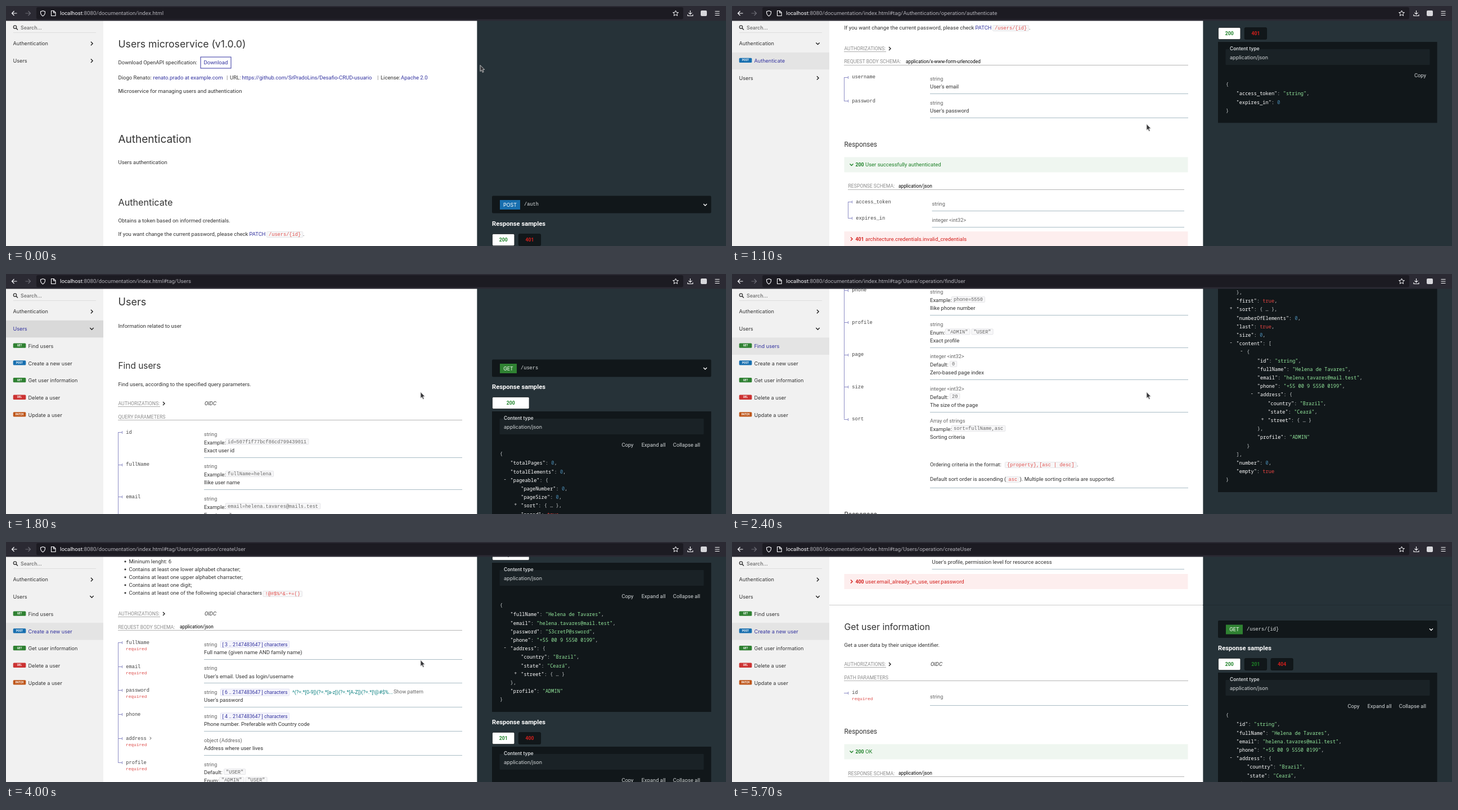
An HTML page for the animation above (6.8 s loop, 1280 by 428 pixels).

```html
<!DOCTYPE html>
<html lang="en">
<head>
<meta charset="utf-8">
<title>Users microservice</title>
<style>
html, body { margin: 0; width: 100%; height: 100%; overflow: hidden; background: #263238; }
svg { display: block; width: 100%; height: 100%; }
text { white-space: pre; }
.r { font-family: Roboto, sans-serif; }
.i { font-family: Inter, sans-serif; }
.m { font-family: "Liberation Mono", monospace; }
.n { font-family: "Noto Sans Mono", monospace; }
.b { font-weight: 700; }
.s { font-weight: 600; }
.o { font-style: italic; }
</style>
</head>
<body>
<svg viewBox="0 0 1280 428" preserveAspectRatio="none">
  <rect width="1280" height="428" fill="#263238"/>
  <rect x="173" width="664.4" height="428" fill="#fff"/>
  <g id="page"></g>
  <g id="side"></g>
  <g id="bar"></g>
  <path id="cursor" d="M.5.5V11.6L3 9.4 4.8 13.4 6.7 12.5 4.9 8.7 8.2 8.4Z" fill="#37373a" stroke="#e8e8e8" stroke-width=".8"/>
</svg>
<script>
const $ = id => document.getElementById(id);
const INK = '#333', BLUE = '#32329f', GREEN = '#1d8127', RED = '#d41f1c';
const VERB = { GET: '#2f8132', POST: '#186faf', DEL: '#cc3333', PATCH: '#bf581d' };
const PERSON = 'Helena de Tavares', MAIL = 'helena.tavares@mail.test', PHONE = '+55 00 9 5550 0199';

let out = [], oy = 0;
const esc = s => String(s).replace(/&/g, '&amp;').replace(/</g, '&lt;');
const put = s => out.push(s);
const flush = id => { $(id).innerHTML = out.join(''); out = []; };

// y is the middle of the capitals
function raw(x, y, html, size, fill, cls, anchor = 'start') {
  put(`<text x="${x}" y="${(y + oy + size * .345).toFixed(2)}" font-size="${size}" fill="${fill}" class="${cls}" text-anchor="${anchor}">${html}</text>`);
}
const text = (x, y, s, size = 9.5, fill = INK, cls = 'r', anchor) => raw(x, y, esc(s), size, fill, cls, anchor);
const rect = (x, y, w, h, fill, extra = '') =>
  put(`<rect x="${x}" y="${y + oy}" width="${w}" height="${h}" fill="${fill}" ${extra}/>`);
const path = (d, stroke, w = 1, fill = 'none') =>
  put(`<path d="${d}" fill="${fill}" stroke="${stroke}" stroke-width="${w}"/>`);
const rule = (x, y, x2, fill = '#a9bcc5') => rect(x, Math.floor(y - .4), x2 - x, 1, fill);

function chevron(x, y, down, color, r = 3, w = 1.4) {
  y += oy;
  path(down ? `M${x - r} ${y - r / 2}l${r} ${r} ${r} ${-r}` : `M${x - r / 2} ${y - r}l${r} ${r} ${-r} ${r}`, color, w);
}

function code(x, y, s, fill = '#e0504d') {
  const w = s.length * 5.2 + 8;
  rect(x + .5, y - 5, w - 1, 10, '#f7f7f8', 'stroke="#dfdfe2" stroke-width=".8" rx="1"');
  text(x + 4, y, s, 8.67, fill, 'm');
  return x + w;
}

// ---- left column ----
const DX = { 'Example:': 38, 'Default:': 35, 'Enum:': 27 };

function typeLine(x, y, s) {
  const [type, min, pattern] = s.split('|');
  text(x, y, type, 9.2, '#666');
  if (!min) return;
  rect(x + 29.5, y - 6, 122, 12, '#f4f4fc', 'stroke="#dcdcf0" stroke-width=".8" rx="1"');
  text(x + 32.5, y, `[ ${min} .. 2147483647 ] characters`, 8.8, BLUE);
  if (!pattern) return;
  text(x + 157, y, '^(?=.*[0-9])(?=.*[a-z])(?=.*[A-Z])(?=.*[!@#$%...', 9.1, '#0b8080');
  text(x + 337, y - 1, 'Show pattern', 9, '#666');
}

function bodyLine(x, y, s) {
  const [label, ...codes] = s.split(' ~');
  text(x, y, label);
  let cx = x + DX[label];
  for (const c of codes) cx = code(cx, y - 1.5, c, '#666') + 2;
}

// each item: [name, type, ...lines]; "*" = required, ">" = expandable
function fields(y, items, inner = false, open = false) {
  const x = inner ? 206 : 199, tx = inner ? 355.5 : 352, end = inner ? 804 : 811, top = y;
  let last = y;
  items.forEach(([name, type, ...lines], n) => {
    const label = name.replace(/[*>]/g, '');
    last = y;
    rect(x, Math.round(y), 8, 1, '#8d8dc6');
    rect(x + 7, Math.round(y) - 2, 1, 5, '#8d8dc6');
    text(x + 14.3, y, label, 8.67, '#444', 'm');
    if (name.includes('>')) chevron(x + 21.5 + label.length * 5.2, y, false, '#555', 2.4, 1);
    if (name.includes('*')) text(x + 14, y + 11.3, 'required', 7.8, '#dc4644', 'm');
    y += 3.7;
    typeLine(tx, y, type);
    for (const s of lines) bodyLine(tx, y += s.includes('~') ? 14.7 : 14, s);
    y += 13;
    if (!open || n < items.length - 1) rule(tx, y, end);
    y += 12.1;
  });
  if (last > top) rect(x, Math.round(top), 1, last - top, '#8d8dc6');
}

function auth(y, scheme) {
  text(199.5, y, 'AUTHORIZATIONS:', 8.7, '#8c8c8c');
  rule(199, y + 6, 274, '#aaa');
  chevron(280.5, y, false, '#222');
  if (scheme) text(353, y, scheme, 9.5, INK, 'r o');
}

function schema(y, label, value, inner) {
  const x = inner ? 206 : 199;
  text(x + .5, y, label, 8.7, '#8c8c8c');
  if (value) text(inner ? 296 : 309, y, value, 8.3, '#000');
  rule(x, y + 6.5, inner ? 804 : 811, '#b5b5b5');
}

function response(y, status, s, ok) {
  const color = ok ? GREEN : RED;
  rect(199.5, y - 13.5, 611, 27, ok ? '#eff6f0' : '#fdeeee');
  chevron(212.5, y, ok, color);
  text(219.5, y, status, 8.8, color, 'r b');
  text(237, y, s, 9.5, color);
}

const heading = (y, s, size) => text(199.5, y, s, size, INK, 'i');
const para = (y, s) => text(199.5, y, s);

// ---- right column ----
const TOKEN = /("[^"]*")(?=:)|("[^"]*")|(true|false)|(\d+)|([^"\dtf]+)/g;
const TINT = ['#fff', '#93e79c', '#e64441', '#4a8bb3', '#c4c8ca'];

function json(y, rows) {
  rows.forEach((row, n) => {
    const [, pad, mark, s] = row.match(/^( *)([+-]?)(.*)$/);
    const x = 878 + pad.length * 18.6, ry = n ? y + 1.3 + n * 15.2 : y;
    if (mark) text(x - 12, ry - 2, mark, 8.67, '#ddd', 'n');
    const html = s.replace(TOKEN, (t, ...g) => `<tspan fill="${TINT[g.findIndex(v => v !== undefined)]}">${esc(t)}</tspan>`);
    raw(x, ry, html, 8.67, '#fff', 'n');
  });
}

function sample(y, tabs, rows, fold = true) {
  const w = tabs.length > 1 ? 39.3 : 65.5;
  const bottom = y + 91 + 1.3 + (rows.length - 1) * 15.2 + 21.5;
  rect(864, y + 15, 389.6, bottom - y - 15, '#11171a');
  tabs.forEach((t, n) => {
    const x = 864.6 + n * 46.7;
    rect(x, y - 10.5, w, 21, n ? '#11171a' : '#fff', 'rx="2" stroke="#0b0f11" stroke-width=".67"');
    text(x + w / 2, y, t, 8.7, t === 'Payload' ? INK : t < 300 ? GREEN : RED, 'r b', 'middle');
  });
  rect(877.5, y + 28, 363, 28, '#1a2226', 'rx="1"');
  text(885, y + 27.5, 'Content type', 8.4, '#d4d8da', 'i s');
  text(885, y + 42.5, 'application/json', 9.1, '#d4d8da', 'i');
  const tool = (x, s) => text(x, y + 75, s, 9.4, '#d4d8da', 'r', 'end');
  tool(1234, fold ? 'Collapse all' : 'Copy');
  if (fold) { tool(1172.5, 'Expand all'); tool(1115.5, 'Copy'); }
  json(y + 91, rows);
}

function endpoint(y, verb, url) {
  const w = verb === 'GET' ? 30 : 36;
  rect(864, y - 15.5, 389.6, 31, '#11171a', 'rx="2"');
  rect(878, y - 8, w, 17, VERB[verb]);
  text(878 + w / 2, y + .5, verb, 8.9, '#fff', 'i', 'middle');
  text(885 + w, y - .5, url, 8.67, '#dfe3e4', 'm');
  chevron(1243, y + .5, true, '#fff');
}

const samplesTitle = y => text(864, y, 'Response samples', 11.2, '#fff', 'r b');

function person(pad, first) {
  const rows = [...first, `"fullName": "${PERSON}",`, `"email": "${MAIL}",`];
  if (!first.length) rows.push('"password": "S3cretP@ssword",');
  rows.push(`"phone": "${PHONE}",`, '-"address": {', ' "country": "Brazil",', ' "state": "Ceará",',
    ' +"street": { … }', '},', '"profile": "ADMIN"');
  return rows.map(s => pad + s);
}
const user = (...first) => ['{', ...person(' ', first), '}'];

// ---- document, each part placed at its scroll offset ----
function buildPage() {
  oy = 0;
  heading(67.5, 'Users microservice (v1.0.0)', 17.6);
  para(101, 'Download OpenAPI specification:');
  rect(346, 91, 54, 20, '#fff', `stroke="${BLUE}"`);
  text(373, 101, 'Download', 9.7, BLUE, 'r', 'middle');
  para(128, 'Diogo Renato:');
  text(261.5, 128, 'renato.prado at example.com', 9.5, BLUE);
  text(392, 128, '|', 9.5, '#777');
  text(398, 128, 'URL:');
  text(419.5, 128, 'https://github.com/SrPradoLins/Desafio-CRUD-usuario', 9.5, BLUE);
  text(660, 128, '|', 9.5, '#777');
  text(666, 128, 'License:');
  text(702, 128, 'Apache 2.0', 9.5, BLUE);
  para(151.5, 'Microservice for managing users and authentication');
  heading(237, 'Authentication', 19);
  para(279, 'Users authentication');
  heading(350.5, 'Authenticate', 16.2);
  para(383, 'Obtains a token based on informed credentials.');
  para(406.5, 'If you want change the current password, please check');
  text(432.5, 406.5, 'PATCH', 9.3, BLUE);
  code(463, 407.5, '/users/{id}');
  text(528, 406.5, '.');
  endpoint(354, 'POST', '/auth');
  samplesTitle(388);
  sample(417, [200, 401], ['{', ' "access_token": "string",', ' "expires_in": 0', '}'], false);

  oy = 368;
  auth(76);
  schema(99, 'REQUEST BODY SCHEMA:', 'application/x-www-form-urlencoded');
  fields(126.5, [['username', 'string', "User's email"], ['password', 'string', "User's password"]]);
  text(199.5, 246.5, 'Responses', 11.9);
  response(283, 200, 'User successfully authenticated', true);
  schema(321, 'RESPONSE SCHEMA:', 'application/json', true);
  fields(349, [['access_token', 'string'], ['expires_in', 'integer <int32>']], true);
  response(415.5, 401, 'architecture.credentials.invalid_credentials');

  oy = 828;
  heading(50, 'Users', 18);
  para(93, 'Information related to user');
  heading(164, 'Find users', 15.4);
  para(197, 'Find users, according to the specified query parameters.');
  auth(231, 'OIDC');
  schema(254.5, 'QUERY PARAMETERS');
  fields(282, [
    ['id', 'string', 'Example: ~id=507f1f77bcf86cd799439011', 'Exact user id'],
    ['fullName', 'string', 'Example: ~fullName=helena', 'Ilike user name'],
    ['email', 'string', 'Example: ~email=helena.tavares@mails.test', 'Exact email'],
    ['phone', 'string', 'Example: ~phone=5550', 'Ilike phone number'],
    ['profile', 'string', 'Enum: ~"ADMIN" ~"USER"', 'Exact profile'],
    ['page', 'integer <int32>', 'Default: ~0', 'Zero-based page index'],
    ['size', 'integer <int32>', 'Default: ~20', 'The size of the page'],
    ['sort', 'Array of strings', 'Example: ~sort=fullName,asc', 'Sorting criteria']
  ], false, true);
  endpoint(168, 'GET', '/users');
  samplesTitle(201.5);
  sample(230, [200], ['{', ' "totalPages": 0,', ' "totalElements": 0,', ' -"pageable": {', '  "pageNumber": 0,',
    '  "pageSize": 0,', '  +"sort": { … },', '  "paged": true,', '  "unpaged": true', ' },', ' "first": true,',
    ' +"sort": { … },', ' "numberOfElements": 0,', ' "last": true,', ' "size": 0,', ' -"content": [', '  -{',
    ...person('   ', ['"id": "string",']), '  }', ' ],', ' "number": 0,', ' "empty": true', '}']);

  oy = 1564;
  text(352, 30, 'Ordering criteria in the format:');
  code(485, 30.5, '{property},[asc | desc]');
  text(613, 30, '.');
  text(352, 56, 'Default sort order is ascending (');
  code(487.5, 56.5, 'asc');
  text(511.5, 56, '). Multiple sorting criteria are supported.');
  rule(352, 72, 811);
  text(199.5, 119, 'Responses', 11.9);
  response(155.5, 200, 'Users found', true);
  schema(194, 'RESPONSE SCHEMA:', 'application/json', true);
  const int = 'integer <int32>';
  fields(221.5, [['totalPages', int], ['totalElements', 'integer <int64>'], ['pageable>', 'object (PageableObject)'],
    ['first', 'boolean'], ['sort>', 'object (SortObject)'], ['numberOfElements', int], ['last', 'boolean'], ['size', int]], true);

  oy = 2300;
  ['Mininum lenght: 6', 'Contains at least one lower alphabet character;', 'Contains at least one upper alphabet charracter;',
    'Contains at least one digit;', 'Contains at least one of the following special characters'].forEach((s, n) => {
    const y = 34.3 + n * 14;
    put(`<circle cx="212" cy="${y + oy + .5}" r="1.6" fill="${INK}"/>`);
    text(218.5, y, s);
  });
  code(456.5, 92.5, '!@#$%^&-+=()');
  auth(128, 'OIDC');
  schema(151.5, 'REQUEST BODY SCHEMA:', 'application/json');
  const shared = [
    ['phone', 'string|4', 'Phone number. Preferable with Country code'],
    ['address>*', 'object (Address)', 'Address where user lives'],
    ['profile*', 'string', 'Default: ~"USER"', 'Enum: ~"ADMIN" ~"USER"', "User's profile, permission level for resource access"]
  ];
  const named = [
    ['fullName*', 'string|3', 'Full name (given name AND family name)'],
    ['email*', 'string', "User's email. Used as login/username"]
  ];
  fields(178.8, [...named, ['password*', 'string|6|p', "User's password"], ...shared]);
  sample(22, ['Payload'], user());
  samplesTitle(321.5);
  sample(350, [201, 400], user('"id": "string",'));

  oy = 2760;
  text(199.5, 41, 'Responses', 11.9);
  response(76.5, 201, 'New user successfully created', true);
  schema(115, 'RESPONSE SCHEMA:', 'application/json', true);
  fields(142.5, [['id', 'string', 'Unique identifier'], ...named, ...shared], true);

  oy = 3128;
  response(70.5, 400, 'user.email_already_in_use, user.password');
  rule(173, 113, 837, '#ccc');
  rule(837, 113, 1280, '#202b30');
  heading(151.5, 'Get user information', 15.8);
  para(184, 'Get a user data by their unique identifier.');
  auth(218, 'OIDC');
  schema(241.5, 'PATH PARAMETERS');
  fields(268.5, [['id*', '']], false, true);
  text(352, 276, 'string', 9.2, '#666');
  rule(352, 291.5, 811);
  text(199.5, 338, 'Responses', 11.9);
  response(374, 200, 'OK', true);
  schema(412.5, 'RESPONSE SCHEMA:', 'application/json', true);
  endpoint(155.5, 'GET', '/users/{id}');
  samplesTitle(189.5);
  sample(218, [200, 201, 404], user('"id": "string",'));
  oy = 0;
  flush('page');
}

// ---- sidebar and address bar ----
const MENU = {
  Authentication: [['POST', 'Authenticate', 'authenticate']],
  Users: [['GET', 'Find users', 'findUser'], ['POST', 'Create a new user', 'createUser'], ['GET', 'Get user information'],
    ['DEL', 'Delete a user'], ['PATCH', 'Update a user']]
};

function drawSide(tag, op) {
  rect(0, 26, 173, 402, '#f1f1f1');
  put('<circle cx="16" cy="37.5" r="2.7" fill="none" stroke="#333" stroke-width="1.3"/>');
  path('M18 39.5l3 3', '#333', 1.5);
  text(26, 39, 'Search...', 8.7, '#777', 'i s');
  rule(13, 48, 160, '#ddd');
  let y = 67;
  const row = (on, fill) => on && rect(0, y - 15, 173, 30.6, fill);
  for (const [group, items] of Object.entries(MENU)) {
    const on = group === tag;
    row(on && !op, '#d9d9d9');
    text(12.5, y, group, 9.15, on && !op ? BLUE : INK, 'i');
    chevron(152.5, y, on, '#222', 3.2);
    y += 30.7;
    if (!on) continue;
    for (const [verb, label, id] of items) {
      const active = op && id === op;
      row(active, '#e4e4e4');
      rect(12.7, y - 4.9, 22.6, 8.3, VERB[verb], 'rx="1.5"');
      text(24, y - .8, verb, 4.6, '#fff', 'r b', 'middle');
      text(39.5, y + .3, label, 9.1, active ? BLUE : INK, 'i');
      y += 30.7;
    }
  }
  flush('side');
}

function drawBar(tag, op) {
  const light = '#fbfbfe';
  rect(0, 0, 1280, 26.5, '#2b2a33');
  rect(54, 2, 1150, 21.5, '#1c1b22', 'rx="3"');
  path('M19.5 13H10.5M14.5 9l-4 4 4 4', light, 1.2);
  path('M34.5 13h9M39.5 9l4 4-4 4', '#6d6c75', 1.2);
  path('M65.5 8.5l4 1.500c.2 4-1 6.500-4 8-3-1.500-4.200-4-4-8z', light, 1.1);
  path('M80.5 8.5h4.500l3 3v6h-7.500zM84.5 8.700v3.300h3.300', light, 1.1);
  const hash = tag ? `#tag/${tag}${op ? '/operation/' + op : ''}` : '';
  raw(96, 13, `localhost<tspan fill="#b1b0b7">:8080/documentation/index.html${hash}</tspan>`, 9.8, light, 'r');
  let star = '';
  for (let n = 0; n < 10; n++) {
    const a = n * Math.PI / 5, r = n % 2 ? 2.4 : 5.2;
    star += `${n ? 'L' : 'M'}${(1190.5 + r * Math.sin(a)).toFixed(1)} ${(13.2 - r * Math.cos(a)).toFixed(1)}`;
  }
  path(star + 'Z', light);
  path('M1216.5 8v6.500M1213.5 11.800l3 3 3-3M1212 15v2.500h9V15', light, 1.1);
  rect(1235, 8, 11, 10, '#d7d7db', 'rx="2"');
  path('M1260.5 9.500h8M1260.5 13h8M1260.5 16.500h8', light, 1.1);
  flush('bar');
}

// ---- motion: [start, steps of 100 ms, from, to, linear] ----
const LOOP = 6800;
const MOVES = [
  [600, 6, 0, 368], [1300, 6, 368, 828, true], [1900, 3, 828, 1196], [2400, 4, 1196, 1564],
  [4000, 1, 1564, 2300], [4300, 1, 2300, 2576], [4700, 1, 2576, 2760], [5200, 1, 2760, 3128]
];
const PLACES = [[0], [172, 'Authentication'], [286, 'Authentication', 'authenticate'], [814, 'Users'],
  [928, 'Users', 'findUser'], [2300, 'Users', 'createUser']];
const POINTER = [[0, 842.5, 105], [100, 811, 162.5], [600, 736.5, 210], [5200, 732.5, 206.5]];
const latest = (list, v) => list.filter(e => e[0] <= v).pop();

function scrollAt(t) {
  const move = latest(MOVES, t);
  if (!move) return 0;
  const [start, steps, from, to, linear] = move;
  const p = Math.min(1, (Math.floor((t - start) / 100) + 1) / steps);
  return Math.round(from + (to - from) * (linear ? p : p * p * (3 - 2 * p)));
}

let place;
function render(t) {
  const y = scrollAt(t), now = latest(PLACES, y), [, cx, cy] = latest(POINTER, t);
  $('page').setAttribute('transform', `translate(0 ${-y})`);
  if (now !== place) {
    place = now;
    drawSide(now[1], now[2]);
    drawBar(now[1], now[2]);
  }
  $('cursor').setAttribute('transform', `translate(${cx} ${cy})`);
  $('cursor').setAttribute('visibility', t < 5700 ? 'visible' : 'hidden');
}

buildPage();
render(0);
const t0 = performance.now();
function tick() {
  render((performance.now() - t0) % LOOP);
  requestAnimationFrame(tick);
}
requestAnimationFrame(tick);
</script>
</body>
</html>
```
